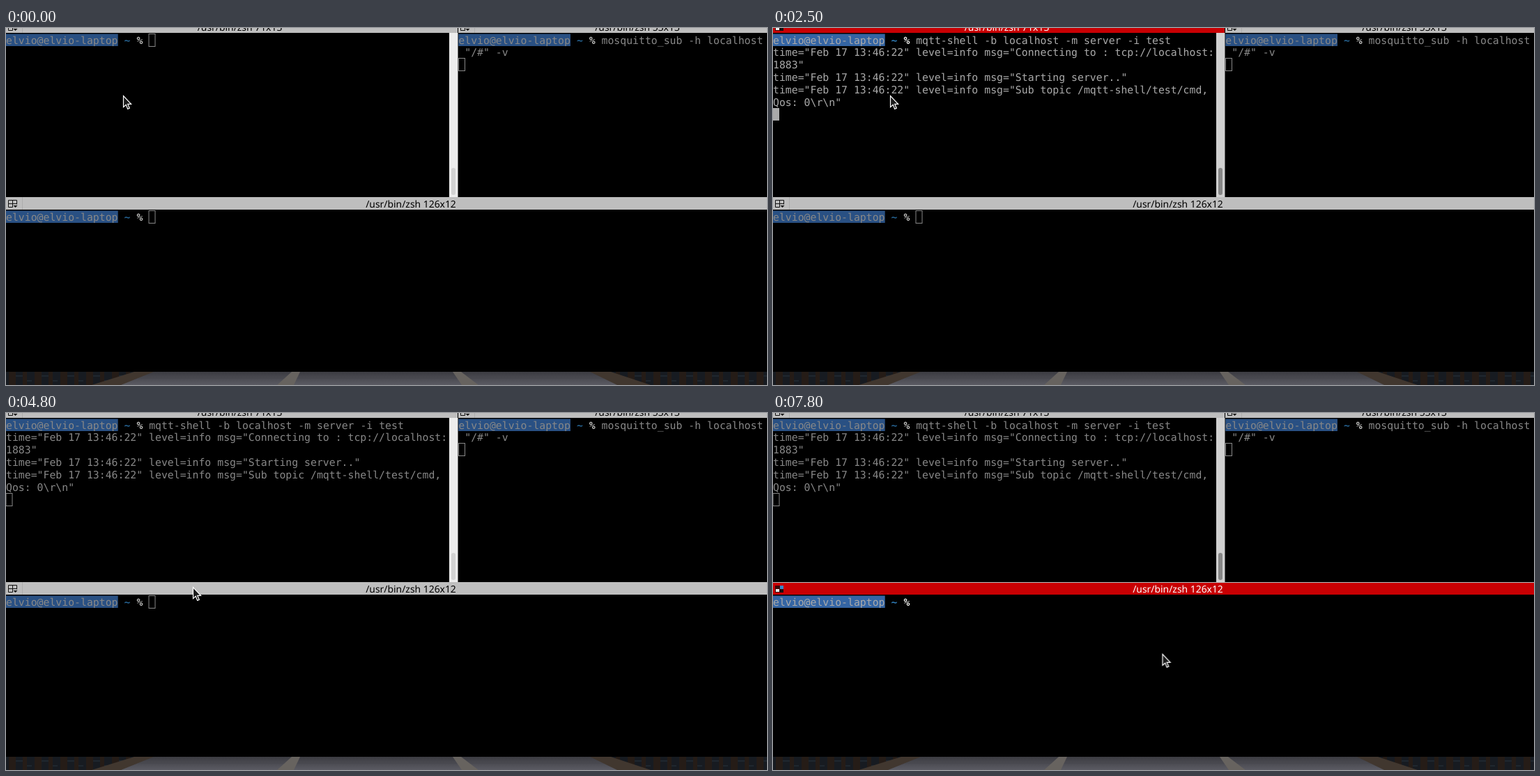
These frames come from a looping animation (1092 px wide and 513 px high, 8000 ms). An HTML page:

```html
<!DOCTYPE html>
<html lang="en">
<head>
<meta charset="utf-8">
<title>Split terminal</title>
<style>
html, body { margin: 0; width: 100%; height: 100%; overflow: hidden; background: #000; }
svg { display: block; width: 1092px; height: 513px; }
text { white-space: pre; text-rendering: geometricPrecision; }
.term { font: 14.82px "DejaVu Sans Mono", monospace; fill: #aaa; }
.bold { font-weight: bold; }
.title { font: 13.9px "Noto Sans", "Open Sans", sans-serif; text-anchor: middle; }
.hollow { fill: none; stroke: #aaa; }
.dim { opacity: .8; }

.anim { animation: 8s step-end infinite; }
#leftText { animation-name: left-dim; }
#leftBar { animation-name: left-bar; }
#bottomText { animation-name: bottom-dim; }
#bottomBar { animation-name: bottom-bar; }
#trough { animation-name: trough; }
#thumb { animation-name: thumb; }
#command { animation-name: command; }
#output { animation-name: output; }
#leftBlock { animation-name: left-block; }
#leftHollow { animation-name: left-hollow; }
#bottomBlock { animation-name: bottom-block; }
#bottomHollow { animation-name: bottom-hollow; }
#pointer { animation-name: pointer; }

/* Focus */
@keyframes left-dim { 0% { opacity: .8 } 3.75% { opacity: 1 } 46.25%, 100% { opacity: .8 } }
@keyframes left-bar { 0% { opacity: 0 } 3.75% { opacity: 1 } 46.25%, 100% { opacity: 0 } }
@keyframes bottom-dim { 0% { opacity: .8 } 87.5%, 100% { opacity: 1 } }
@keyframes bottom-bar { 0% { opacity: 0 } 87.5%, 100% { opacity: 1 } }
@keyframes trough {
  0% { fill: #ededed } 3.75% { fill: #e4e4e4 } 5% { fill: #dadada } 6.25% { fill: #d3d3d3 }
  7.5% { fill: #d0d0d0 } 46.25% { fill: #d4d4d4 } 47.5% { fill: #dfdfdf } 48.75% { fill: #e8e8e8 }
  50% { fill: #ededed } 87.5% { fill: #dadada } 88.75% { fill: #d3d3d3 } 90%, 100% { fill: #d0d0d0 }
}
@keyframes thumb {
  0% { fill: #d2d2d2 } 3.75% { fill: #868686 } 46.25% { fill: #d2d2d2 } 87.5%, 100% { fill: #868686 }
}

/* Terminal contents */
@keyframes command { 0% { opacity: 0 } 18.75%, 100% { opacity: 1 } }
@keyframes output { 0% { opacity: 0 } 31.25%, 100% { opacity: 1 } }
@keyframes left-block {
  0% { opacity: 0; transform: translate(205px, 0) }
  3.75% { opacity: 1; transform: translate(205px, 0) }
  10% { opacity: 0; transform: translate(205px, 0) }
  17.5% { opacity: 1; transform: translate(205px, 0) }
  18.75% { opacity: 1; transform: translate(571px, 0) }
  25% { opacity: 0; transform: translate(571px, 0) }
  31.25% { opacity: 1; transform: translate(0, 107px) }
  36.25% { opacity: 0; transform: translate(0, 107px) }
  43.75% { opacity: 1; transform: translate(0, 107px) }
  46.25%, 100% { opacity: 0; transform: translate(0, 107px) }
}
@keyframes left-hollow {
  0% { opacity: 1; transform: translate(205px, 0) }
  3.75% { opacity: 0; transform: translate(0, 107px) }
  46.25%, 100% { opacity: 1; transform: translate(0, 107px) }
}
@keyframes bottom-block { 0% { opacity: 0 } 87.5% { opacity: 1 } 93.75%, 100% { opacity: 0 } }
@keyframes bottom-hollow { 0% { opacity: 1 } 87.5%, 100% { opacity: 0 } }

@keyframes pointer {
  0% { transform: translate(168px, 97px) }
  38.75% { transform: translate(185px, 148px) }
  41.25% { transform: translate(190px, 168px) }
  42.5% { transform: translate(197px, 202px) }
  43.75% { transform: translate(207px, 242px) }
  45% { transform: translate(218px, 279px) }
  46.25% { transform: translate(225px, 296px) }
  47.5% { transform: translate(233px, 291px) }
  48.75% { transform: translate(245px, 275px) }
  50% { transform: translate(254px, 262px) }
  51.25% { transform: translate(258px, 257px) }
  55% { transform: translate(257px, 257px) }
  60% { transform: translate(268px, 250px) }
  61.25% { transform: translate(352px, 264px) }
  62.5% { transform: translate(480px, 302px) }
  63.75% { transform: translate(573px, 326px) }
  66.25% { transform: translate(640px, 336px) }
  67.5% { transform: translate(810px, 342px) }
  68.75% { transform: translate(952px, 344px) }
  71.25% { transform: translate(1200px, 344px) }
  93.75% { transform: translate(1040px, 342px) }
  95% { transform: translate(850px, 345px) }
  96.25% { transform: translate(650px, 346px) }
  97.5%, 100% { transform: translate(558.5px, 346px) }
}
</style>
</head>
<body>
<svg viewBox="0 0 1092 513">
  <defs>
    <g id="prompt">
      <rect y=".5" width="160.7" height="17.5" fill="#3465a4"/>
      <text y="14.6">elvio@elvio-laptop</text>
      <text class="bold" x="169.6" y="14.6" fill="#2f7bb5">~</text>
      <text class="bold" x="187.4" y="14.6" fill="#eeeeec">%</text>
    </g>
    <rect id="block" width="9" height="18" fill="#aaa"/>
    <rect id="box" class="hollow" x=".5" y=".5" width="9" height="18"/>
    <g id="icon">
      <path d="M3.5 4.5h12v6M3.5 4.5v10h6M9.5 4.5v10M3.5 9.5h12" fill="none" stroke="#111"/>
      <path d="M10.5 12h6l-3 3z" fill="#111"/>
      <path d="M23.5 0v18" stroke="#adadad"/>
    </g>
    <g id="activeIcon">
      <path d="M3 5h12v10h-12z" fill="#3a0808"/>
      <path d="M10 5h5v5h-5z" fill="#3a87c8"/>
      <path d="M4 10h5v4h-5z" fill="#eee"/>
      <path d="M10 11h5v4h-5z" fill="#111"/>
    </g>
    <linearGradient id="deck" x2="0" y2="1">
      <stop stop-color="#3b3b41"/>
      <stop offset="1" stop-color="#5b5b63"/>
    </linearGradient>
    <pattern id="posts" width="37" height="19" y="494" patternUnits="userSpaceOnUse">
      <path d="M0 0h37v19H0z" fill="#171b21"/>
      <path d="M4 0h10v19H4zM24 0h6v19h-6z" fill="#251c17"/>
      <path d="M14 6h10M30 13h7" stroke="#27323d"/>
    </pattern>
  </defs>

  <!-- Wallpaper: a wooden walkway -->
  <path d="M0 494h1092v19H0z" fill="url(#posts)"/>
  <path d="M205 494H865l50 19H155z" fill="url(#deck)"/>
  <path d="M190 503H890" stroke="#46464d"/>
  <path d="M184 494h28l-47 19h-42zM838 494h30l57 19h-48z" fill="#41372f"/>
  <path d="M410 494h12l-9 19h-24zM641 494h12l25 19h-24z" fill="#67635f"/>

  <path d="M0 0h1092v494H0z"/>

  <!-- Title bars -->
  <path d="M0 0h648v7H0zM649 0h443v7H649zM0 243h1092v18H0z" fill="#bebebe"/>
  <use href="#icon" y="-11"/>
  <use href="#icon" x="649" y="-11"/>
  <use href="#icon" y="243"/>
  <text class="title" x="335.5" y="4">/usr/bin/zsh 71x13</text>
  <text class="title" x="906" y="4">/usr/bin/zsh 53x13</text>
  <text class="title" x="581" y="258">/usr/bin/zsh 126x12</text>
  <g id="leftBar" class="anim">
    <path d="M0 0h648v7H0z" fill="#c80003"/>
    <use href="#activeIcon" y="-11"/>
    <text class="title" x="335.5" y="4" fill="#fff">/usr/bin/zsh 71x13</text>
  </g>
  <g id="bottomBar" class="anim">
    <path d="M0 244h1092v17H0z" fill="#c80003"/>
    <use href="#activeIcon" y="243"/>
    <text class="title" x="581" y="258" fill="#fff">/usr/bin/zsh 126x12</text>
  </g>

  <!-- Scrollbar -->
  <rect id="trough" class="anim" x="636" y="7" width="12.5" height="236"/>
  <rect id="thumb" class="anim" x="639" y="201" width="6" height="39" rx="3"/>

  <!-- Server pane -->
  <g transform="translate(0 8)">
    <g id="leftText" class="term anim">
      <use href="#prompt"/>
      <text id="command" class="anim" x="205.2" y="14.6">mqtt-shell -b localhost -m server -i test</text>
      <g id="output" class="anim">
        <text y="32.4">time="Feb 17 13:46:22" level=info msg="Connecting to : tcp://localhost:</text>
        <text y="50.3">1883"</text>
        <text y="68.1">time="Feb 17 13:46:22" level=info msg="Starting server.."</text>
        <text y="86">time="Feb 17 13:46:22" level=info msg="Sub topic /mqtt-shell/test/cmd,</text>
        <text y="103.8">Qos: 0\r\n"</text>
      </g>
      <g id="leftHollow" class="anim"><use href="#box" x="-.5"/></g>
      <g id="leftBlock" class="anim"><use href="#block"/></g>
    </g>
  </g>

  <!-- Subscriber pane -->
  <g class="term dim" transform="translate(649.3 8)">
    <use href="#prompt"/>
    <text x="205.2" y="14.6">mosquitto_sub -h localhost</text>
    <text y="32.4"> "/#" -v</text>
    <use href="#box" x="-.3" y="35"/>
  </g>

  <!-- Client pane -->
  <g transform="translate(0 262)">
    <g id="bottomText" class="term anim">
      <use href="#prompt"/>
      <g id="bottomHollow" class="anim"><use href="#box" x="204.5"/></g>
      <g id="bottomBlock" class="anim"><use href="#block" x="205"/></g>
    </g>
  </g>

  <g id="pointer" class="anim">
    <path d="M.5.5v16.2l3.7-3.4 2.5 6.1 2.6-1.1-2.6-6h4.9z" fill="#1a1a1a" stroke="#fff" stroke-width="1.2"/>
  </g>
</svg>
</body>
</html>
```
